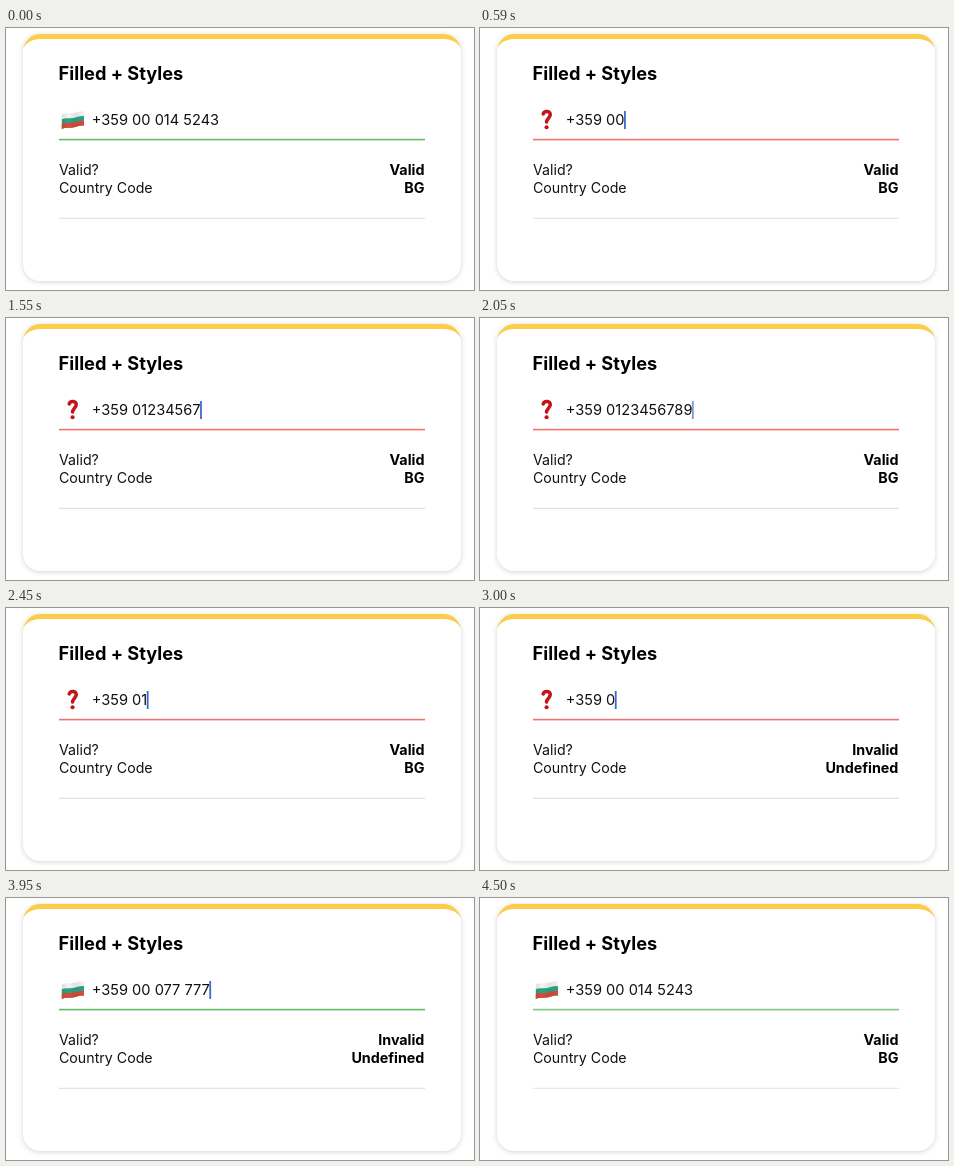
Write an HTML page that moves like this. It is 468 px wide and 262 px high and loops after 4.97 s.

```html
<!DOCTYPE html>
<html lang="en">
<head>
<meta charset="utf-8">
<title>Phone input</title>
<style>
  html, body { margin: 0; width: 100%; height: 100%; overflow: hidden; background: #fff; }
  svg { display: block; width: 100vw; height: 100vh; }
  text { font-family: Inter, "Open Sans", sans-serif; font-size: 14.2px; fill: #111; white-space: pre; }
  .title { font-size: 18.2px; font-weight: 700; fill: #000; }
  .value { font-size: 14.3px; font-weight: 700; text-anchor: end; fill: #000; }
  #phone { font-size: 14.6px; }
  #card { filter: drop-shadow(0 1px 2.5px rgba(0, 0, 0, .17)); }
</style>
</head>
<body>
<svg viewBox="0 0 468 262">
  <defs>
    <clipPath id="wave">
      <path d="M55.8 86.4C59 84.6 63 85.6 67 85.1S74 82.6 78 83.4V97.8C74 97 71 99.1 67 99.5S59 99.3 55.8 100.9Z"/>
    </clipPath>
    <linearGradient id="shade">
      <stop offset="0" stop-opacity=".1"/>
      <stop offset=".3" stop-opacity="0"/>
      <stop offset=".6" stop-opacity=".08"/>
      <stop offset="1" stop-opacity="0"/>
    </linearGradient>
  </defs>

  <rect id="card" x="17" y="6" width="438" height="247" rx="17" fill="#fff"/>
  <path fill="#fbcd4b" d="M17 23.5A17.5 17.5 0 0 1 34.5 6H437.5A17.5 17.5 0 0 1 455 23.5A17.5 12.6 0 0 0 437.5 10.9H34.5A17.5 12.6 0 0 0 17 23.5Z"/>

  <text class="title" x="52.6" y="52.3">Filled + Styles</text>

  <g id="flag" clip-path="url(#wave)">
    <rect x="55" y="82" width="24" height="20" fill="#f4f4f4"/>
    <path fill="#2ba586" d="M55 91.4C59 89.5 63 90.4 67 89.9S74 87.4 79 88.2V102H55Z"/>
    <path fill="#dd4a38" d="M55 96.2C59 94.3 63 95.2 67 94.7S74 92.2 79 93V102H55Z"/>
    <rect x="55" y="82" width="24" height="20" fill="url(#shade)"/>
  </g>
  <g id="query" fill="none" stroke="#c3141a" stroke-linecap="round">
    <path stroke-width="3.5" d="M63.2 85.9C64.2 82.4 70.8 82.7 70.2 87C69.8 90 66.8 90.8 66.5 94"/>
    <path stroke-width="4" d="M66.5 99.2h.1"/>
  </g>

  <text id="phone" x="85.8" y="97.2" xml:space="preserve"></text>
  <rect id="caret" y="83" width="1.8" height="18" fill="#3f69c8"/>
  <rect id="line" x="53" y="110.8" width="366" height="1.6"/>

  <text x="53" y="147.2">Valid?</text>
  <text x="53" y="165.2">Country Code</text>
  <text id="state" class="value" x="418.4" y="147.2"></text>
  <text id="country" class="value" x="418.4" y="165.2"></text>
  <rect id="rule" x="53" y="189.8" width="366" height="1" fill="#dcdcdc"/>
</svg>

<script>
const LOOP = 4970;
const PREFIX = '+359 ', PHONE_X = 85.8;
const FIRST = '000145243', LONG = '0123456789', LAST = '00077777';
const RESET = 4500;

const $ = id => document.getElementById(id);
const [flag, query, phone, caret, line, state, country, rule] =
  ['flag', 'query', 'phone', 'caret', 'line', 'state', 'country', 'rule'].map($);

const clamp = v => Math.max(0, Math.min(1, v));
const every = (start, step, n) => Array.from({ length: n }, (_, i) => start + i * step);
const passed = (times, t) => times.filter(k => k <= t).length;

const eraseFirst = [...every(320, 45, 7), 680, 770];
const typeLong = [...every(1090, 54, 6), ...every(1450, 90, 4)];
const eraseLong = every(2100, 50, 10);
const typeLast = [3000, 3140, 3270, ...every(3500, 100, 5)];
const caretOff = [[860, 1040], [1820, 2080], [2680, 2950], [4090, 4700]];

const grouped = d => [d.slice(0, 2), d.slice(2, 5), d.slice(5)].filter(Boolean).join(' ');

function digitsAt(t) {
  if (t >= RESET) return grouped(FIRST);
  if (t < 860) return grouped(FIRST.slice(0, FIRST.length - passed(eraseFirst, t)));
  if (t < 2640) return LONG.slice(0, passed(typeLong, t) - passed(eraseLong, t));
  const d = LAST.slice(0, passed(typeLast, t));
  if (t >= 3950) return grouped(d);
  return d.slice(0, 3) + (t >= 3410 ? ' ' : '') + d.slice(3);
}

function caretAlpha(t) {
  if (t < 180 || t >= RESET) return 0;
  return caretOff.reduce((a, [from, to]) =>
    Math.min(a, 1 - Math.min(clamp((t - from) / 90), clamp((to - t) / 90))), 1);
}

function draw(t) {
  const ok = t < 320 || t >= 3910;
  const saved = t < 2640 || t >= 4320;
  const soft = t >= RESET ? 0.8 : 1;

  phone.textContent = PREFIX + digitsAt(t);
  caret.setAttribute('x', PHONE_X + phone.getComputedTextLength() - 0.5);
  caret.setAttribute('opacity', caretAlpha(t));
  flag.setAttribute('visibility', ok ? 'visible' : 'hidden');
  query.setAttribute('visibility', ok ? 'hidden' : 'visible');
  line.setAttribute('fill', ok ? '#5fbd64' : '#f2736e');
  line.setAttribute('opacity', soft);
  rule.setAttribute('opacity', soft);
  state.textContent = saved ? 'Valid' : 'Invalid';
  country.textContent = saved ? 'BG' : 'Undefined';
}

const begin = performance.now();
function tick() {
  draw((performance.now() - begin) % LOOP);
  requestAnimationFrame(tick);
}
tick();
</script>
</body>
</html>
```
